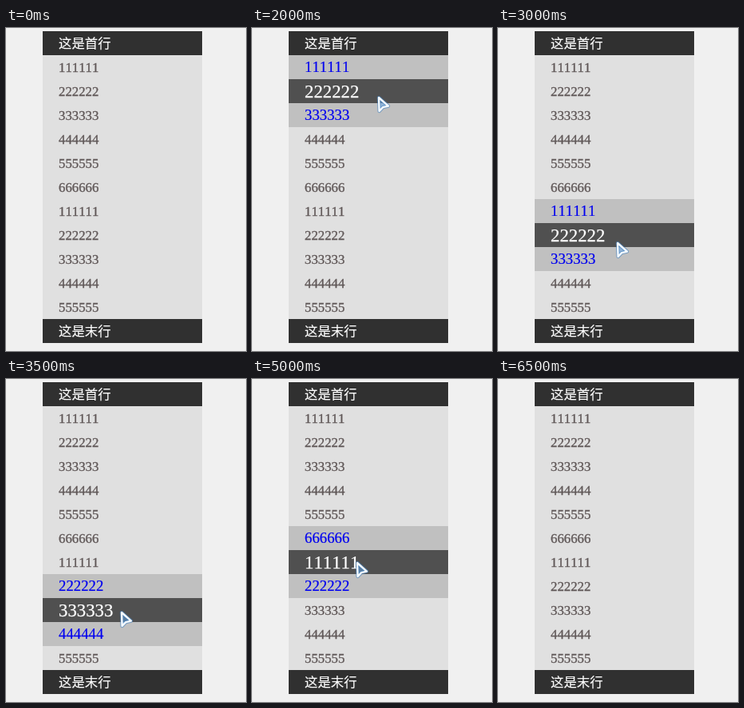
Animation, 301 px wide and 404 px high, one loop 7000 ms. Source, as an HTML page with a canvas:

```html
<!DOCTYPE html>
<html lang="zh">
<head>
<meta charset="utf-8">
<title>列表悬停</title>
<style>
html, body { margin: 0; width: 100%; height: 100%; overflow: hidden; background: #f0f0f0; }
canvas { display: block; width: 301px; height: 404px; }
</style>
</head>
<body>
<canvas id="stage"></canvas>
<script>
const W = 301, H = 404, STEP = 500, LOOP = 7000;
const LEFT = 46, TOP = 4, ROW_W = 200, ROW_H = 30, LAST = 12;
const canvas = document.getElementById('stage');
const ctx = canvas.getContext('2d');
const dpr = window.devicePixelRatio || 1;
canvas.width = W * dpr;
canvas.height = H * dpr;

// Pointer tip and hovered row for each step; null when the pointer is away
const steps = [
  null,
  [190, 8, 0], [178, 14, 0], [168, 50, 1], [157, 85, 2], [153, 140, 4],
  [148, 267, 8], [143, 290, 9], [133, 351, 11], [126, 374, 12],
  [130, 228, 7], [135, 46, 1], [251, 24, 0],
  null
];

const styles = {
  plain: { bg: '#e0e0e0', fg: '#605858', size: 16.8, base: 21, bold: 0.35 },
  near:  { bg: '#c0c0c0', fg: '#0000f0', size: 18.8, base: 21, bold: 0.2 },
  over:  { bg: '#505050', fg: '#ffffff', size: 22.8, base: 23, bold: 0.25 },
  end:   { bg: '#303030', fg: '#ffffff', size: 16.4, base: 21, bold: 0.15 },
  endOver: { bg: '#f0a000', fg: '#605858', size: 16.4, base: 21, bold: 0.15 }
};

const isEnd = i => i === 0 || i === LAST;

function label(i) {
  if (i === 0) return '这是首行';
  if (i === LAST) return '这是末行';
  return String((i - 1) % 6 + 1).repeat(6);
}

function rowStyle(i, hover) {
  if (isEnd(i)) return i === hover ? styles.endOver : styles.end;
  if (i === hover) return styles.over;
  const near = hover !== null && !isEnd(hover) && Math.abs(i - hover) === 1;
  return near ? styles.near : styles.plain;
}

function drawRow(i, hover) {
  const s = rowStyle(i, hover), y = TOP + i * ROW_H;
  ctx.fillStyle = s.bg;
  ctx.fillRect(LEFT, y, ROW_W, ROW_H);
  const family = isEnd(i) ? '"Noto Sans CJK SC", "Noto Sans CJK", sans-serif' : '"Liberation Serif", serif';
  ctx.font = `${s.size}px ${family}`;
  ctx.fontKerning = 'none';
  ctx.fillStyle = ctx.strokeStyle = s.fg;
  ctx.lineWidth = s.bold;
  ctx.fillText(label(i), LEFT + 20, y + s.base);
  ctx.strokeText(label(i), LEFT + 20, y + s.base);
}

function drawPointer(x, y) {
  ctx.save();
  ctx.translate(x, y);
  ctx.lineJoin = 'round';
  ctx.beginPath();
  ctx.moveTo(2, 2);
  ctx.lineTo(2.6, 19);
  ctx.lineTo(7.2, 14.2);
  ctx.lineTo(14, 12.6);
  ctx.closePath();
  // See-through glass: the row below tints the body
  ctx.fillStyle = 'rgba(100,170,240,0.5)';
  ctx.fill();
  ctx.strokeStyle = 'rgba(70,130,190,0.6)';
  ctx.lineWidth = 4.4;
  ctx.stroke();
  ctx.strokeStyle = '#f4faff';
  ctx.lineWidth = 2.4;
  ctx.stroke();
  ctx.restore();
}

function draw(now) {
  const step = steps[Math.floor(now % LOOP / STEP)];
  const hover = step ? step[2] : null;
  ctx.setTransform(dpr, 0, 0, dpr, 0, 0);
  ctx.fillStyle = '#f0f0f0';
  ctx.fillRect(0, 0, W, H);
  for (let i = 0; i <= LAST; i++) drawRow(i, hover);
  if (step) drawPointer(step[0], step[1]);
}

const start = performance.now();
function tick() {
  draw(performance.now() - start);
  requestAnimationFrame(tick);
}
tick();
</script>
</body>
</html>
```
